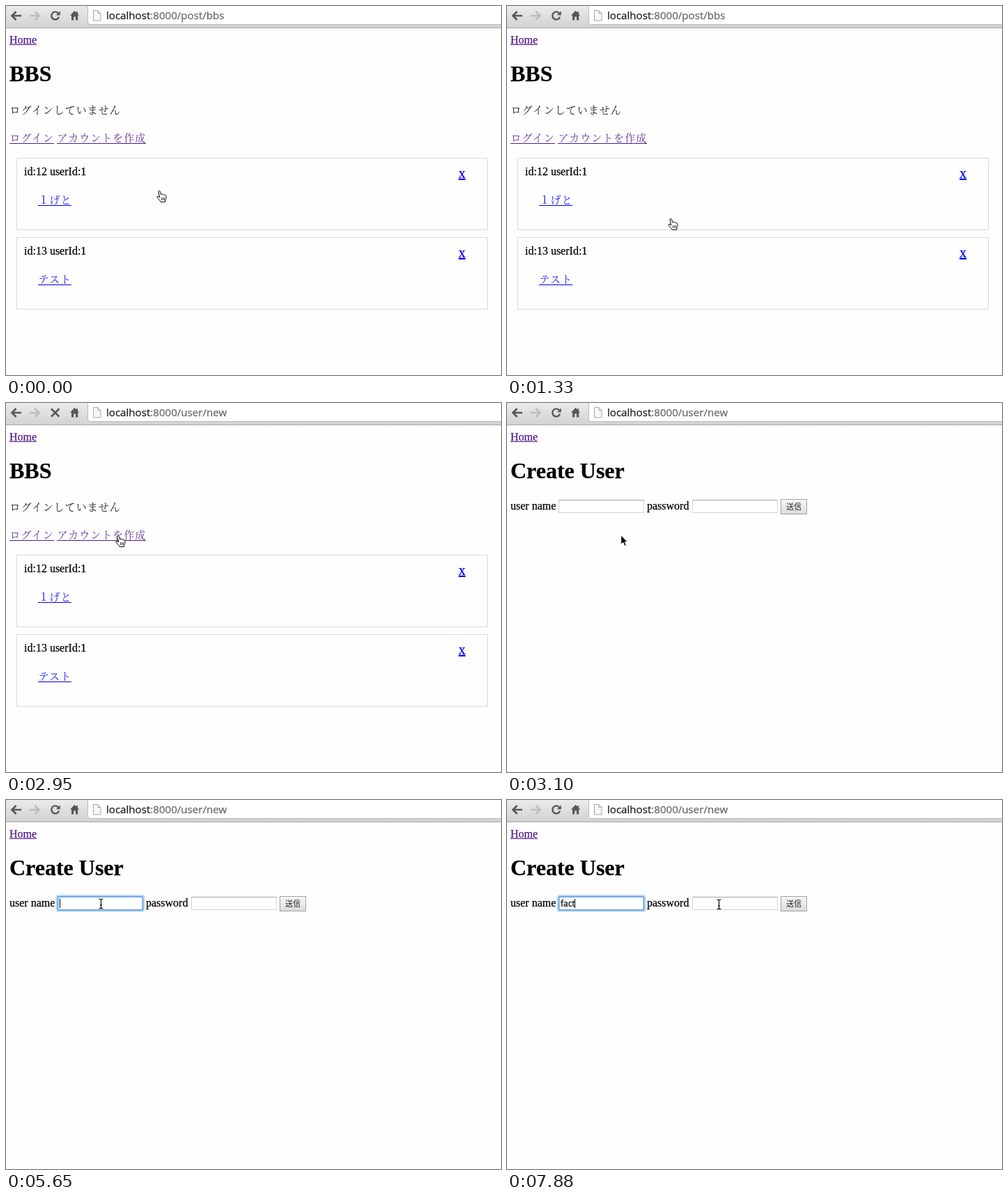
Recreate the animation shown at these times as an HTML page. Size 711x530 px, loop 8000 ms.

```html
<!DOCTYPE html>
<html lang="ja">
<head>
<meta charset="utf-8">
<title>BBS</title>
<style>
html, body { margin: 0; width: 100%; height: 100%; overflow: hidden; background: #fefefe; }
svg { display: block; width: 711px; height: 530px; }
text {
  font: 16px "Liberation Serif", "Times New Roman", serif; white-space: pre;
  fill: currentColor; stroke: currentColor; stroke-width: .25;
}
.h1 { font-size: 32px; font-weight: bold; }
.jp { font: 15px "Noto Serif CJK JP", "Noto Sans CJK JP", "Noto Sans CJK", sans-serif; letter-spacing: 1px; stroke: none; fill-opacity: .88; }
.url { font: 15.1px "Open Sans", sans-serif; color: #1c1c1c; }
.url tspan { fill: #666; stroke: #666; }
.field { font: 12px "Open Sans", sans-serif; }
.button { font-size: 11px; letter-spacing: 0; }
.link { color: #0000ee; }
.seen { color: #551a8b; }
rect.link, rect.seen { fill: currentColor; }
.line { fill: none; stroke: #585858; stroke-width: 2.4; }
.thick { stroke-width: 2.7; }
</style>
</head>
<body>
<svg viewBox="0 0 711 530">
  <defs>
    <linearGradient id="bar" x2="0" y2="1">
      <stop stop-color="#ebebeb"/><stop offset="1" stop-color="#d2d2d2"/>
    </linearGradient>
    <linearGradient id="btn" x2="0" y2="1">
      <stop stop-color="#f8f8f8"/><stop offset="1" stop-color="#dcdcdc"/>
    </linearGradient>
  </defs>
  <rect width="711" height="530" fill="#fefefe"/>

  <g id="toolbar">
    <rect width="711" height="31" fill="url(#bar)"/>
    <rect y="31" width="711" height="1" fill="#a8a8a8"/>
    <path d="M117.5 -2V23Q117.5 26.5 121 26.5H713V-2Z" fill="#fff" stroke="#bcbcbc"/>
    <path class="line thick" d="M22 14H9M14.5 8L8.5 14L14.5 20"/>
    <path class="line thick" d="M34 14H47M41.5 8L47.5 14L41.5 20" style="stroke:#bdbdbd"/>
    <g id="reload">
      <path class="line" d="M75.2 10.6A5.5 5.5 0 1 0 76 15.6"/>
      <path d="M77.8 7.2V13.2H71.8Z" fill="#585858"/>
    </g>
    <path id="stop" class="line thick" d="M65 8.2L76.4 19.6M76.4 8.2L65 19.6"/>
    <path d="M98.5 6.8L92 13.6H94V20.6H97.2V15.6H100V20.6H103.2V13.6H105.2L103 11.2V8H101.2V9.4Z" fill="#585858"/>
    <path d="M125.5 6.5H132L136 10.5V21H125.5Z" fill="#f7f7f7" stroke="#a6a6a6"/>
    <path d="M132 6.5V10.5H136" fill="#e0e0e0" stroke="#a6a6a6"/>
    <text class="url" x="144" y="19">localhost<tspan>:8000</tspan><tspan id="path"></tspan></text>
  </g>

  <text class="seen" x="5" y="54">Home</text>
  <rect class="seen" x="5" y="55" width="39" height="1"/>

  <g id="board">
    <text class="h1" x="5" y="108">BBS</text>
    <text class="jp" x="5.5" y="155">ログインしていません</text>
    <text class="jp seen" x="5.5" y="195">ログイン</text>
    <rect class="seen" x="5" y="197" width="64" height="1"/>
    <text class="jp seen" x="73.5" y="195">アカウントを作成</text>
    <rect class="seen" x="73" y="197" width="128" height="1"/>
    <g id="posts"></g>
  </g>

  <g id="form">
    <text class="h1" x="5" y="108">Create User</text>
    <text x="5" y="153">user name</text>
    <text x="201" y="153">password</text>
    <g fill="#fff" stroke="#d4d4d4">
      <rect x="74.5" y="139.5" width="122" height="18"/>
      <rect x="266.5" y="139.5" width="122" height="18"/>
      <path d="M74 139.5H197M266 139.5H389" stroke="#a8a8a8"/>
    </g>
    <g id="ring" fill="none">
      <rect x="73.5" y="138" width="124" height="21" rx="2" stroke="#c3dcf5" stroke-width="4"/>
      <rect x="74.5" y="139" width="122" height="19" rx="1" stroke="#71aae4" stroke-width="2"/>
    </g>
    <text id="typed" class="field" x="77" y="153"></text>
    <rect id="caret" y="142" width="1" height="13"/>
    <rect x="393.5" y="138.5" width="37" height="21" fill="url(#btn)" stroke="#a0a0a0"/>
    <text class="jp button" x="401" y="153" style="font-family:'Noto Sans CJK JP',sans-serif">送信</text>
  </g>

  <g id="hand" stroke="#000" stroke-linejoin="round">
    <path fill="#fff" d="M3 1.8C3 .3 5.2 .2 5.6 1.6L6.6 5.8C7 4.9 8.6 4.9 8.9 6C9.4 5.3 10.9 5.5 11.2 6.6C12 6.1 13.5 6.4 13.8 7.7C14.4 9.6 13.8 12 12.9 13.6L12.7 16.4H6.2C5.8 14.6 3 12.6 1.2 10.3C.3 9 1.6 7.8 3 8.6L4.7 9.9Z"/>
    <path fill="none" stroke-width=".8" d="M7.5 10V14M9.5 10V14M11.5 10V14"/>
  </g>
  <path id="arrow" d="M.7 1V14.2L3.8 11.4L6 16.4L8.4 15.4L6.2 10.6H10.3Z" stroke="#fff"/>
  <g id="beam" fill="none">
    <path d="M-3 -7Q0 -7 0 -5Q0 -7 3 -7M0 -5.5V5.5M-3 7Q0 7 0 5Q0 7 3 7M-1.5 2H1.5" stroke="#fff" stroke-width="2.4" opacity=".7"/>
    <path d="M-3 -7Q0 -7 0 -5Q0 -7 3 -7M0 -5.5V5.5M-3 7Q0 7 0 5Q0 7 3 7M-1.5 2H1.5" stroke="#000" stroke-width="1.1"/>
  </g>
</svg>
<script>
const LOOP = 8000;
const el = id => document.getElementById(id);
const show = (id, on) => el(id).setAttribute('visibility', on ? 'inherit' : 'hidden');

const post = (id, title, y) => `
  <rect x="15.5" y="${y + .5}" width="676" height="103" fill="none" stroke="#d9d9d9"/>
  <text x="26" y="${y + 25}">id:${id} userId:1</text>
  <text class="link" x="650" y="${y + 29}" style="font-size:20px">x</text>
  <rect class="link" x="650" y="${y + 30}" width="10" height="2"/>
  <text class="jp link" x="46.5" y="${y + 66}">${title}</text>
  <rect class="link" x="46" y="${y + 68}" width="48" height="1"/>`;
el('posts').innerHTML = post(12, '１げと', 218) + post(13, 'テスト', 332);

// [start ms, pointer shape, x, y]
const pointer = [
  [0, 'hand', 216, 265], [140, 'hand', 220, 300], [290, 'hand', 224, 360],
  [590, 'hand', 205, 345], [740, 'hand', 167, 295], [890, 'hand', 185, 258],
  [1030, 'hand', 222, 256], [1180, 'hand', 242, 284], [1330, 'hand', 231, 305],
  [1630, 'hand', 225, 282], [1780, 'hand', 205, 234], [1920, 'arrow', 217, 200],
  [2070, 'arrow', 230, 188], [2370, 'arrow', 213, 189], [2520, 'hand', 176, 189],
  [2660, 'hand', 157, 190], [3100, 'arrow', 163, 189], [3400, 'arrow', 152, 177],
  [3550, 'beam', 140, 153], [3700, 'beam', 136.5, 149],
  [7580, 'beam', 168, 152], [7730, 'beam', 258, 155], [7880, 'beam', 304.5, 150]
];

// [start ms, typed letters, caret shown]
const NAME = 'fact';
const typing = [
  [0, 0, false], [3850, 0, true], [4300, 0, false], [4750, 1, true],
  [5350, 1, false], [5650, 0, true], [6240, 2, true], [6540, 3, true],
  [6840, 4, true], [7290, 4, false], [7580, 4, true]
];
const caretX = [77, 81, 87, 93, 97];

const at = (track, t) => track.filter(step => step[0] <= t).pop();

function draw(t) {
  const loading = t >= 2950 && t < 3100;
  el('path').textContent = t < 2950 ? '/post/bbs' : '/user/new';
  show('reload', !loading);
  show('stop', loading);
  show('board', t < 3100);
  show('form', t >= 3100);
  show('ring', t >= 3850);

  const [, count, caret] = at(typing, t);
  el('typed').textContent = NAME.slice(0, count);
  el('caret').setAttribute('x', caretX[count]);
  show('caret', caret);

  const [, shape, x, y] = at(pointer, t);
  for (const id of ['hand', 'arrow', 'beam']) show(id, id === shape);
  el(shape).setAttribute('transform', `translate(${x} ${y})`);
}

const start = performance.now();
function tick() {
  draw((performance.now() - start) % LOOP);
  requestAnimationFrame(tick);
}
tick();
</script>
</body>
</html>
```
